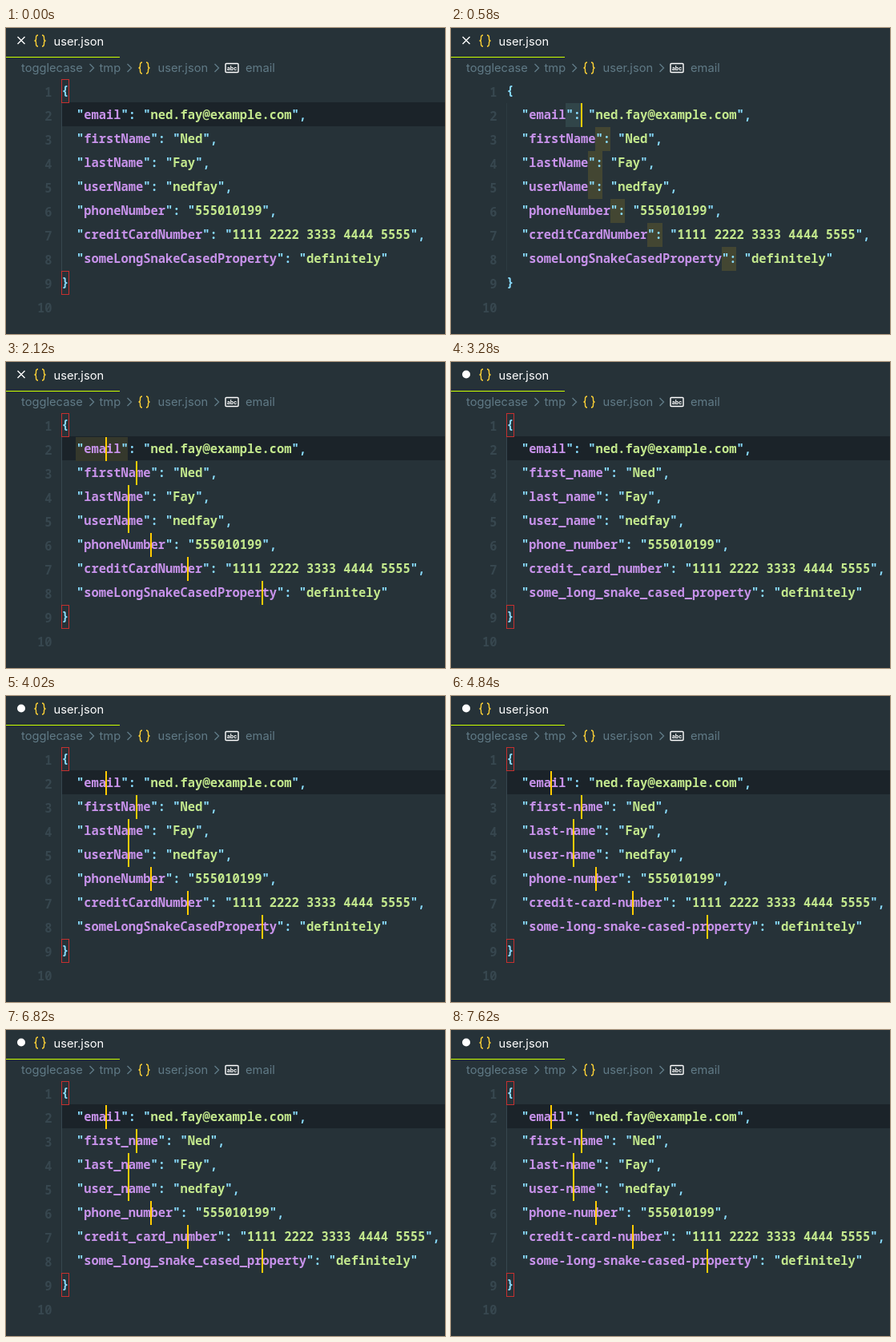
These frames come from a looping animation (548x383 px, 7.66 s). An HTML page:

```html
<!DOCTYPE html>
<html lang="en">
<head>
<meta charset="utf-8">
<title>Toggle case</title>
<style>
  html, body { margin: 0; width: 100%; height: 100%; overflow: hidden; background: #263238; }
  svg { display: block; }
  text { white-space: pre; }
  .ui { font: 14.7px Inter, sans-serif; fill: #607a86; }
  .mono { font: 700 15.45px "Noto Sans Mono", monospace; }
  .num { fill: #37474f; text-anchor: end; }
  .punct { fill: #89ddff; }
  .key { fill: #c792ea; }
  .value { fill: #c3e88d; }
  .line { fill: none; stroke-width: 1.4; }
</style>
</head>
<body>
<svg width="548" height="383" viewBox="0 0 548 383">
  <defs>
    <path id="braces" class="line" stroke="#fbd036" stroke-width="1.7"
      d="M5 0Q2.5 0 2.5 3V4.5Q2.5 7 .5 7Q2.5 7 2.5 9.5V11Q2.5 14 5 14M10 0Q12.5 0 12.5 3V4.5Q12.5 7 14.5 7Q12.5 7 12.5 9.5V11Q12.5 14 10 14"/>
    <path id="chevron" class="line" stroke="#607a86" d="M0 0L5 5L0 10"/>
  </defs>
  <rect width="548" height="383" fill="#263238"/>
  <path id="close" class="line" stroke="#fff" d="M14.5 11L23.5 20M23.5 11L14.5 20"/>
  <circle id="dirty" cx="19" cy="15.5" r="5" fill="#fff"/>
  <use href="#braces" x="35" y="9"/>
  <text class="ui" x="59.5" y="22" style="fill:#fff">user.json</text>
  <rect y="36" width="142" height="1" fill="#ccff00"/>
  <g class="ui">
    <text x="19" y="55">togglecase</text>
    <text x="116.5" y="55">tmp</text>
    <text x="189.5" y="55">user.json</text>
    <text x="299" y="55">email</text>
  </g>
  <use href="#chevron" x="104.5" y="45"/>
  <use href="#chevron" x="151.5" y="45"/>
  <use href="#chevron" x="260.5" y="45"/>
  <use href="#braces" x="165" y="43"/>
  <rect class="line" x="274" y="44.5" width="16" height="11" rx="1" stroke="#fff"/>
  <text x="282" y="52.5" text-anchor="middle" fill="#fff" style="font:700 7px Inter,sans-serif">abc</text>
  <g id="editor"></g>
</svg>
<script>
const LOOP = 7660, CHAR = 9.27, LEFT = 87.9, TOP = 64, ROW = 30;
const entries = [
  ['email', 'ned.fay@example.com'],
  ['firstName', 'Ned'],
  ['lastName', 'Fay'],
  ['userName', 'nedfay'],
  ['phoneNumber', '555010199'],
  ['creditCardNumber', '1111 2222 3333 4444 5555'],
  ['someLongSnakeCasedProperty', 'definitely'],
];

// [start, word separator]; an empty separator means camelCase
const cases = [
  [0, ''], [3280, '_'], [3640, '-'], [3960, ''], [4280, '_'], [4840, '-'],
  [5120, ''], [5420, '_'], [5720, '-'], [6040, ''], [6240, '_'], [6460, '-'],
  [6640, ''], [6820, '_'], [7080, '-'], [7220, ''], [7420, '_'], [7620, '-'],
];
// [start, rows with a caret, caret offset from the key's end, selected characters]
const cursors = [
  [0, 0, 0, 0], [20, 1, 0, 0], [320, 1, 1, 1], [580, 1, 2, 2], [860, 7, 2, 2],
  [1280, 7, 0, 0], [1480, 7, -1, 0], [1700, 7, -2, 0], [1980, 0, 0, 0],
  [2120, 7, -2, 0], [2420, 0, 0, 0], [2720, 7, -2, 0], [3020, 0, 0, 0], [3320, 7, -2, 0],
];

const at = (list, t) => list.findLast(item => item[0] <= t);
const get = id => document.getElementById(id);
const colX = col => Math.floor(LEFT + col * CHAR);
const rowY = row => TOP + row * ROW;
const rect = (x, y, w, h, fill, extra = '') =>
  `<rect x="${x}" y="${y}" width="${w}" height="${h}" fill="${fill}" ${extra}/>`;
const columns = (from, to, y, fill) => rect(colX(from), y, colX(to) - colX(from), ROW, fill);
const mono = (x, y, kind, content) => `<text class="mono ${kind}" x="${x}" y="${y}">${content}</text>`;
const span = (kind, s) => `<tspan class="${kind}">${s}</tspan>`;

function editor(t) {
  const [, separator] = at(cases, t);
  const [, carets, offset, selected] = at(cursors, t);
  let back = '', text = '', front = '';

  if (!selected) {
    back += rect(70, rowY(1) - 1, 478, ROW, '#1b2329');
    for (const row of [0, 8])
      front += rect(69.5, rowY(row) + .5, 9, 29, 'none', 'stroke="#c5302f"');
  }
  back += rect(69, rowY(1), 1, 210, '#37474f', `opacity="${selected ? .45 : 1}"`);
  if (t >= 1980 && t < 3280) back += columns(0, 7, rowY(1), '#35382c');

  for (let row = 0; row < 10; row++)
    text += mono(57.5, rowY(row) + 22, 'num', row + 1);
  text += mono(69.3, rowY(0) + 20, 'punct', '{') + mono(69.3, rowY(8) + 20, 'punct', '}');

  entries.forEach(([key, value], i) => {
    const y = rowY(i + 1), end = key.length + 1;
    const name = separator ? key.replace(/[A-Z]/g, c => separator + c.toLowerCase()) : key;
    if (selected && (i < carets || selected > 1))
      back += columns(end, end + selected, y, i < carets ? '#314549' : '#434632');
    text += mono(LEFT, y + 20, 'punct',
      '"' + span('key', name) + '": "' + span('value', value) + '"' + (i < 6 ? ',' : ''));
    if (i < carets) front += rect(colX(end + offset), y, 2, ROW, '#ffcc00');
  });
  return back + text + front;
}

let shown = '';
function draw(now) {
  const t = now % LOOP, next = editor(t), edited = t >= 3280;
  if (next !== shown) get('editor').innerHTML = shown = next;
  get('close').style.display = edited ? 'none' : '';
  get('dirty').style.display = edited ? '' : 'none';
}

const start = performance.now();
function tick() {
  draw(performance.now() - start);
  requestAnimationFrame(tick);
}
tick();
</script>
</body>
</html>
```
